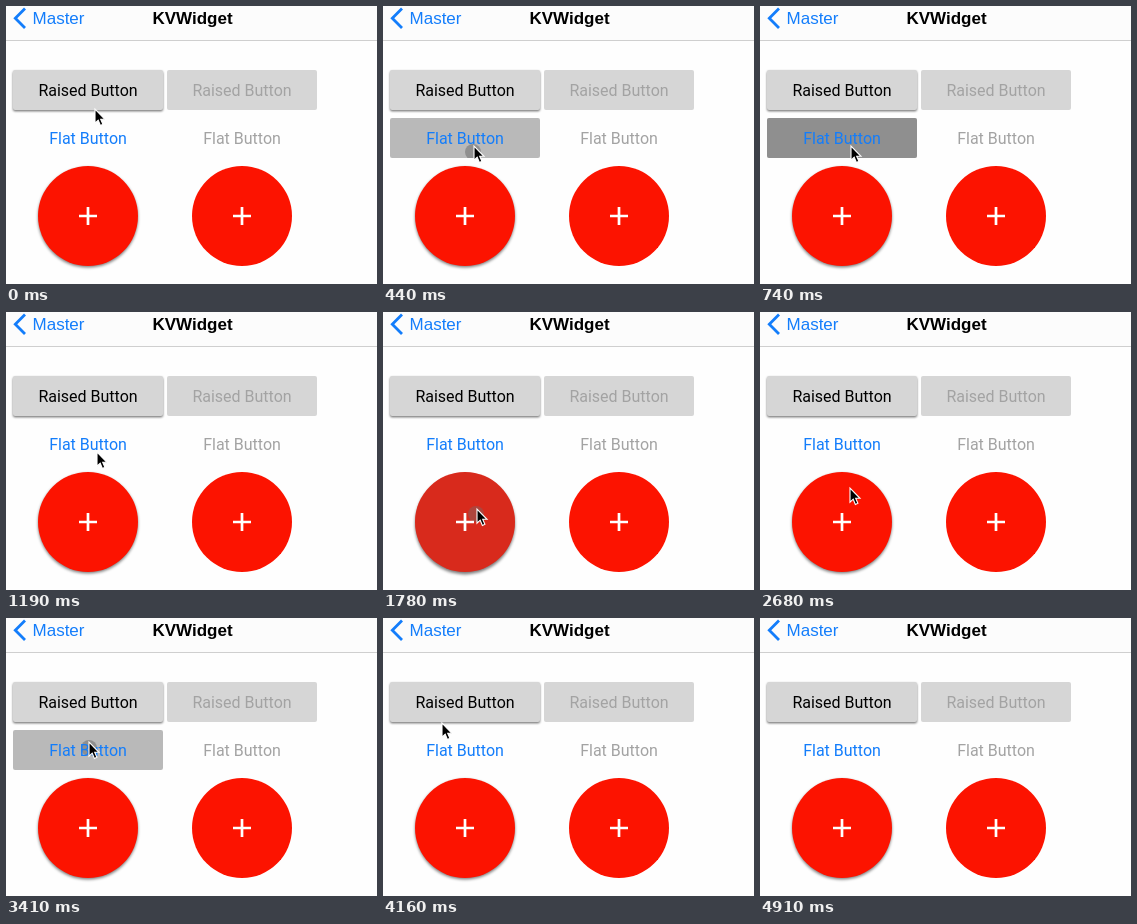
An HTML page that plays this animation: 371 by 278 pixels, repeating every 5350 ms.

```html
<!DOCTYPE html>
<html lang="en">
<head>
<meta charset="utf-8">
<title>Buttons</title>
<style>
  html, body { margin: 0; width: 100%; height: 100%; overflow: hidden; background: #fefefe; }
  svg { display: block; width: 371px; height: 278px; }
  text { font: 16px Roboto, sans-serif; text-anchor: middle; }
  .bar { font: 17px "Liberation Sans", Arial, sans-serif; }
  .title { font-weight: bold; }
  .blue { fill: #137dfb; }
  .off { fill: #a3a3a3; }
  .plus { stroke: #fff; stroke-width: 2.7; }
  #flat, #fab { visibility: hidden; }
</style>
</head>
<body>
<svg viewBox="0 0 371 278">
  <defs>
    <filter id="soft" x="-20%" y="-20%" width="140%" height="140%"><feGaussianBlur stdDeviation="0.8"/></filter>
    <filter id="deep" x="-20%" y="-20%" width="140%" height="140%"><feGaussianBlur stdDeviation="1.5"/></filter>
    <clipPath id="flatClip"><rect x="7" y="112" width="150" height="40" rx="2"/></clipPath>
    <clipPath id="fabClip"><circle cx="82" cy="210" r="50"/></clipPath>
    <path id="plus" class="plus" d="M-9 0H9M0 -9V9"/>
  </defs>

  <rect width="371" height="34" fill="#fcfcfc"/>
  <rect y="34" width="371" height="1" fill="#cfcfcf"/>
  <path d="M19 2.5L9.3 12.2L19 21.9" fill="none" stroke="#137dfb" stroke-width="2.8"/>
  <text class="bar blue" x="52.5" y="18">Master</text>
  <text class="bar title" x="186.5" y="18">KVWidget</text>

  <rect x="7" y="65.2" width="150" height="40" rx="2" opacity=".55" filter="url(#soft)"/>
  <rect x="7" y="64" width="150" height="40" rx="2" fill="#d6d6d6"/>
  <text x="82" y="90">Raised Button</text>
  <rect x="161" y="64" width="150" height="40" rx="2" fill="#d6d6d6"/>
  <text class="off" x="236" y="90">Raised Button</text>

  <g id="flat" clip-path="url(#flatClip)">
    <rect x="7" y="112" width="150" height="40" fill="#808080" opacity=".54"/>
    <circle fill="#6e6e6e" opacity=".55"/>
  </g>
  <text class="blue" x="82" y="138">Flat Button</text>
  <text class="off" x="236" y="138">Flat Button</text>

  <circle id="shadow" cx="82" cy="211.6" r="50" opacity=".5" filter="url(#deep)"/>
  <circle cx="82" cy="210" r="50" fill="#fc1300"/>
  <g id="fab" clip-path="url(#fabClip)">
    <rect x="32" y="160" width="100" height="100" fill="#6e6e6e" opacity=".254"/>
    <circle fill="#6e6e6e" opacity=".4"/>
  </g>
  <use href="#plus" x="82" y="210"/>
  <circle cx="236" cy="210" r="50" fill="#fc1300"/>
  <use href="#plus" x="236" y="210"/>

  <path id="cursor" d="M1 1V15.2L4.2 12.2L6.4 17.4L8.9 16.3L6.7 11.3H11Z" fill="#000" stroke="#fff" stroke-width="1.1"/>
</svg>
<script>
  const LOOP = 5350, TICKS = 36;
  const $ = id => document.getElementById(id);
  const flat = $('flat'), fab = $('fab'), shadow = $('shadow'), cursor = $('cursor');

  // pointer stops: tick, x, y
  const path = [
    [0, 88, 102], [2, 90, 139], [8, 90, 139], [10, 93, 196], [17, 93, 196],
    [18, 89, 175], [21, 82, 123], [24, 82, 123], [25, 109, 128], [26, 57, 123],
    [27, 57, 123], [28, 58, 104], [29, 39, 80], [30, 60, 43], [31, 150, 110],
    [32, 259, 259], [33, 259, 290], [36, 259, 290]
  ];

  // presses: group, first tick, length, ripple centre
  const presses = [
    [flat, 3, 5, 90, 146],
    [fab, 12, 3, 93, 202],
    [flat, 22, 3, 83, 130]
  ];

  function pointer(n) {
    const i = path.findIndex(p => p[0] > n);
    const [a, x, y] = path[i - 1], [b, u, v] = path[i];
    const k = (n - a) / (b - a);
    return [x + (u - x) * k, y + (v - y) * k];
  }

  function ripple([group, start, life, x, y], n) {
    const k = n - start;
    if (k < 0 || k >= life) return;
    const dot = group.querySelector('circle');
    dot.setAttribute('cx', x);
    dot.setAttribute('cy', y);
    dot.setAttribute('r', 8 + 45 * k);
    group.style.opacity = k < 2 ? 1 : (life - k) / (life - 2);
    group.style.visibility = 'visible';
    if (group === fab) shadow.setAttribute('cy', 212.4);
  }

  function draw(now) {
    const t = now % LOOP;
    const n = Math.min(TICKS - 1, Math.floor((t + 6) * TICKS / LOOP));
    flat.style.visibility = fab.style.visibility = 'hidden';
    shadow.setAttribute('cy', 211.6);
    presses.forEach(p => ripple(p, n));
    cursor.setAttribute('transform', `translate(${pointer(n)})`);
  }

  const begin = performance.now();
  function loop() {
    draw(performance.now() - begin);
    requestAnimationFrame(loop);
  }
  loop();
</script>
</body>
</html>
```
